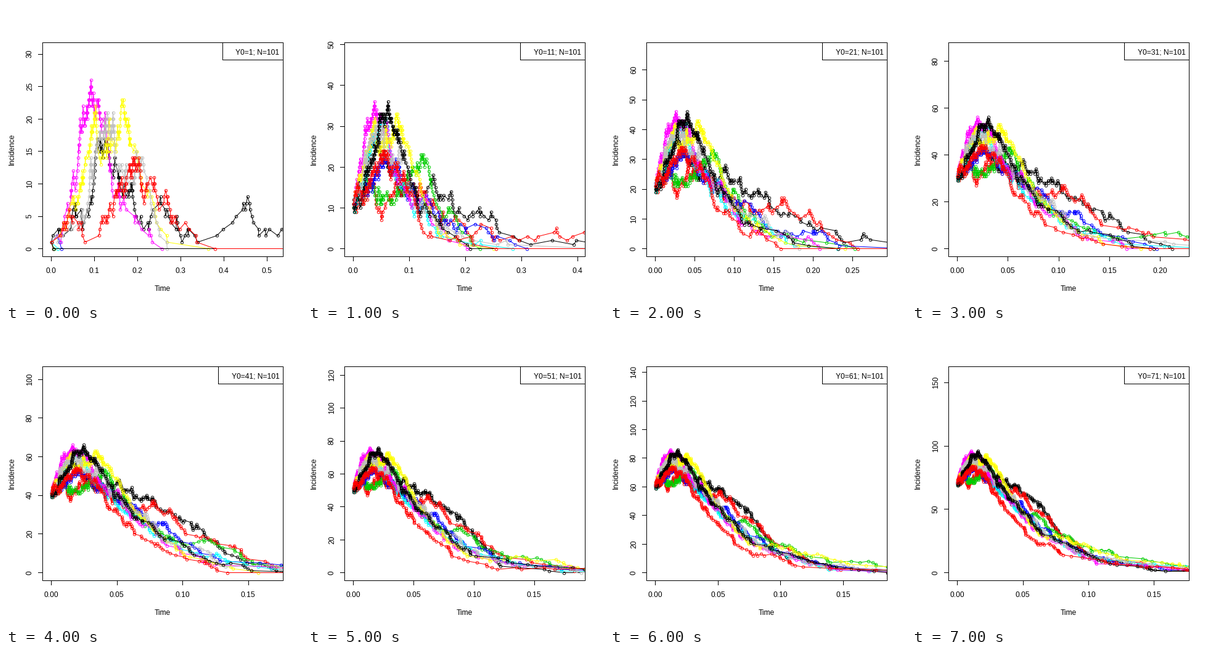
A matplotlib script that plays this animation: 480x480 px, repeating every 8000 ms.

```python
import matplotlib.pyplot as plt
import numpy as np
from matplotlib.animation import FuncAnimation
from matplotlib.patches import Rectangle

plt.rcParams["font.family"] = "Liberation Sans"
plt.rcParams["font.size"] = 12

SIZE = 480
LEFT, RIGHT, TOP, BOTTOM = 59, 449, 59, 406
X0, Y0_PX = 73.2, 393.2
SPAN_X, SPAN_Y = 361.8, 321.8

STARTS = range(1, 72, 10)
X_MAX = [0.5176, 0.3975, 0.2826, 0.22, 0.1698, 0.1849, 0.178, 0.170]
RECOVERY = 21

rng = np.random.default_rng(4)


def event_rate(tau):
    """Infections and recoveries per case; susceptibles run out with tau."""
    return 20 + 60 * np.exp(-0.56 * tau)


def bridge(level, rise, count, low, high):
    """Random +1/-1 steps that lead to level + rise between two bounds."""
    ups = (count + rise) // 2
    steps = np.repeat([1, -1], [ups, count - ups])
    for _ in range(300):
        rng.shuffle(steps)
        path = level + np.cumsum(steps)
        if path.min(initial=level) >= low and path.max(initial=level) <= high:
            break
    return path


# Case-time at which every walk passes its key levels
KNOTS = [0.03, 0.3, 0.6, 0.9, 1.3, 1.8, 2.5, 3.5, 4.5, 5.3]


def epidemic(*levels):
    """Change in cases after each event, and the case-time between events."""
    end = KNOTS[-1] + (71 + levels[-1]) / RECOVERY
    walk, clock, now = [0], [], 0
    for tau, target in zip(KNOTS + [end], levels + (-71,)):
        level = walk[-1]
        rise = target - level
        count = max(abs(rise), round(event_rate(now) * (tau - now)))
        count += (count - rise) % 2
        low = 0 if min(level, target) >= 0 else max(min(level, target) - 3, -71)
        walk.extend(bridge(level, rise, count, low, max(levels)))
        waits = rng.exponential(size=count)
        clock.extend(waits * (tau - now) / waits.sum())
        now = tau
    return np.array(walk), np.array(clock)


CURVES = [
    ("black", epidemic(1, 4, 16, 14, 8, 6, 6, -2, -16, -50)),
    ("red", epidemic(-1, 3, -2, 6, 4, 1, -6, -9, -29, -58)),
    ("#00cd00", epidemic(-2, 4, 4, 0, 8, 12, -2, -25, -40, -53)),
    ("blue", epidemic(-1, 4, 9, 12, 10, 4, -6, -20, -46, -64)),
    ("cyan", epidemic(-2, 7, 16, 21, 21, 5, -8, -24, -47, -65)),
    ("magenta", epidemic(1, 12, 18, 25, 21, 11, -1, -21, -47, -66)),
    ("yellow", epidemic(2, 9, 18, 14, 18, 22, 13, -12, -43, -50)),
    ("#bebebe", epidemic(1, 12, 17, 20, 11, 14, -1, -18, -45, -60)),
    ("black", epidemic(-1, 9, 13, 21, 25, 18, 3, -17, -42, -63)),
    ("red", epidemic(2, 3, 9, 13, 10, 3, -15, -47, -66, -69)),
]


def trace(start, walk, clock):
    """Times and cases until the last one recovers, then a line along zero."""
    level = start + walk
    end = np.argmax(level <= 0)
    times = np.cumsum(clock[:end] / level[:end])
    return np.r_[0, times, 5], np.r_[level[:end + 1], 0]


fig = plt.figure(figsize=(SIZE / 72, SIZE / 72), dpi=72, facecolor="white")
ax = fig.add_axes([0, 0, 1, 1])


def stroke(xs, ys):
    ax.plot(xs, ys, color="black", lw=1, antialiased=False,
            solid_capstyle="butt")


def label(x, y, text, upright=False, ha="center"):
    ax.text(x, y, text, ha=ha, va="baseline", rotation=90 * upright,
            rotation_mode="anchor", zorder=5)


def frame_box(left, bottom, zorder, fill):
    box = Rectangle((left, TOP), RIGHT - left, bottom - TOP, lw=1, ec="black",
                    fc=fill, antialiased=False, zorder=zorder)
    return ax.add_patch(box)


def draw_axes(x_max, y_max):
    x_step, digits = (0.1, 1) if x_max > 0.3 else (0.05, 2)
    y_step = next(step for step in (5, 10, 20, 50) if y_max / step < 7.5)
    for i in range(int(x_max * 1.04 / x_step) + 1):
        x = X0 + SPAN_X * i * x_step / x_max
        stroke([x, x], [BOTTOM, BOTTOM + 7])
        label(x, 433, f"{i * x_step:.{digits}f}")
    for value in range(0, int(y_max * 1.04) + 1, y_step):
        y = Y0_PX - SPAN_Y * value / y_max
        stroke([LEFT - 7, LEFT], [y, y])
        label(42, y, str(value), upright=True)
    label(253.5, 462, "Time")
    label(13, 232.5, "Incidence", upright=True)


def draw(i):
    ax.clear()
    ax.set(xlim=(0, SIZE), ylim=(SIZE, 0))
    ax.axis("off")
    start, x_max = STARTS[i], X_MAX[i]
    y_max = 1.8 * (start + 16)
    draw_axes(x_max, y_max)

    box = frame_box(LEFT, BOTTOM, 3, "none")
    for color, (walk, clock) in CURVES:
        times, level = trace(start, walk, clock)
        line, = ax.plot(X0 + 0.3 + SPAN_X * times / x_max,
                        Y0_PX + 0.3 - SPAN_Y * level / y_max,
                        "-o", color=color, lw=1, ms=4.5, mfc="none", mew=0.9)
        line.set_clip_path(box)

    frame_box(351 if start < 10 else 344, 87, 4, "white")
    label(443.5, 79, f"Y0={start}; N=101", ha="right")
    return []


anim = FuncAnimation(fig, draw, frames=len(STARTS), init_func=lambda: [],
                     interval=1000, repeat=True, repeat_delay=0)
plt.show()
```
